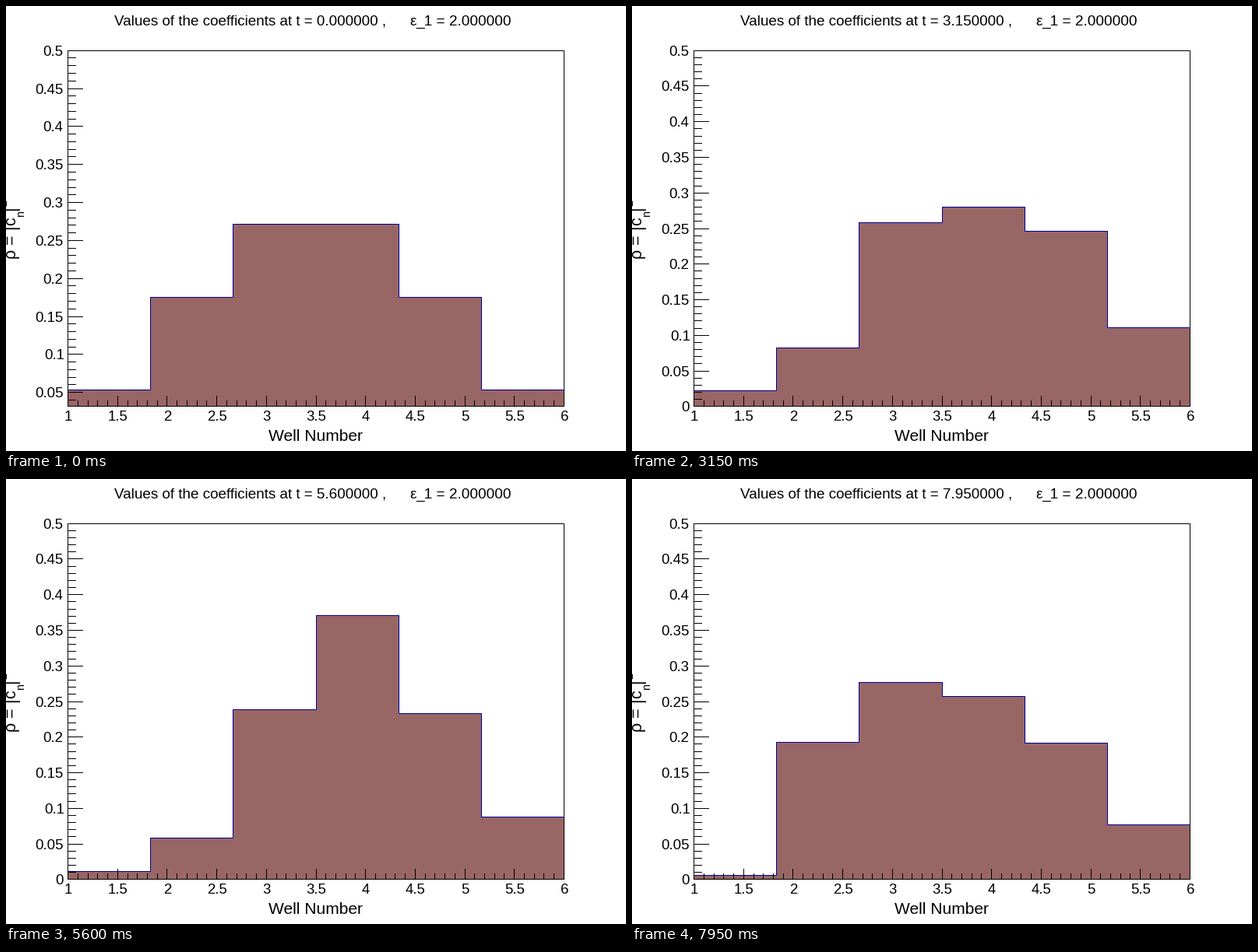
Animation, 796 px wide and 572 px high, one loop 8000 ms. Source, as a matplotlib script:

```python
import numpy as np
import matplotlib.pyplot as plt
from matplotlib.animation import FuncAnimation
from matplotlib.collections import LineCollection
from matplotlib.patches import Polygon

W, H, DPI = 796, 572, 64
PX = 72 / DPI                      # points per pixel
LEFT, RIGHT, TOP, BOTTOM = 79.6, 716.4, 57.2, 514.8
Y_MAX, MARGIN = 0.5, 0.05
FRAMES, STEP = 160, 0.05
WELLS, EPS_1 = 6, 2.0
BLUE, FILL = "#000099", "#996666"

# Chain of coupled wells with a raised first well, started in the
# ground state of the level chain.
ham = -np.eye(WELLS, k=1) - np.eye(WELLS, k=-1)
ham[0, 0] = EPS_1
energy, modes = np.linalg.eigh(ham)
sites = np.arange(1, WELLS + 1)
start = np.sqrt(2 / (WELLS + 1)) * np.sin(np.pi * sites / (WELLS + 1))
weights = modes.T @ start


def density(t):
    return np.abs(modes @ (np.exp(-1j * energy * t) * weights)) ** 2


def centre(v):
    return np.floor(v) + 0.5


def x_pix(x):
    return centre(LEFT + (x - 1) / 5 * (RIGHT - LEFT))


def y_pix(y, low):
    return centre(TOP + (Y_MAX - y) / (Y_MAX - low) * (BOTTOM - TOP))


def axis_low(rho):
    pad = MARGIN * (Y_MAX - rho.min())
    return max(0.0, rho.min() - pad)


fig = plt.figure(figsize=(W / DPI, H / DPI), dpi=DPI, facecolor="white")
ax = fig.add_axes([0, 0, 1, 1])
ax.set_xlim(0, W)
ax.set_ylim(H, 0)
ax.axis("off")


def label(x, y, s, size, ha="left", **kw):
    return ax.text(x, y, s, fontsize=size * PX, ha=ha, va="baseline",
                   family="Liberation Sans", color="black", **kw)


# Points already sit on pixel centres, so snapping is off everywhere.
def strokes(segments):
    lines = LineCollection(segments, colors="black", linewidths=PX,
                           snap=False, zorder=4, capstyle="projecting")
    ax.add_collection(lines)
    return lines


def trace(xs, ys, color, zorder):
    line, = ax.plot(xs, ys, color=color, lw=PX, snap=False, zorder=zorder,
                    solid_joinstyle="miter", solid_capstyle="projecting")
    return line


x0, x1, y0, y1 = (centre(v) for v in (LEFT, RIGHT, TOP, BOTTOM))
edges = x_pix(1 + 5 * np.arange(WELLS + 1) / WELLS)

# Frame and horizontal axis
trace([x0, x1, x1], [y0, y0, y1], "black", 2.5)
strokes([[(x0, y0), (x0, y1)], [(x0, y1), (x1, y1)]])
strokes([[(x_pix(1 + k / 10), y1),
          (x_pix(1 + k / 10), y1 - (13 if k % 5 == 0 else 7))]
         for k in range(51)])
for k in range(11):
    label(LEFT + k * (RIGHT - LEFT) / 10 + 0.5, 533, f"{1 + k / 2:g}",
          18.6, "center")
label(397.5, 559, "Well Number", 21, "center")

# Vertical axis title, set piece by piece from the bottom up
SIZE, BASE = 21.5, 12
pen = 324
for s, drop, scale, width in [
        ("ρ", 0, 1, 0.57 + 0.278), ("=", 0, 1, 0.584 + 0.278),
        ("|", 0, 1, 0.26), ("c", 0, 1, 0.5), ("n", 11, 0.67, 0.556),
        ("|", 0, 1, 0.26), ("2", -11, 0.67, 0.556)]:
    label(BASE + drop, pen, s, SIZE * scale, rotation=90,
          rotation_mode="anchor")
    pen -= width * scale * SIZE

# Title
title = label(139, 24.5, "", 18.9)
label(518, 25, "ε", 19)
label(649, 25, f"_1 = {EPS_1:.6f}", 19, "right")

# Moving parts
area = Polygon([(x0, y1), (x1, y1), (x1, y1)], closed=True, facecolor=FILL,
               edgecolor="none", snap=False, zorder=2)
ax.add_patch(area)
outline = trace([], [], BLUE, 3)
y_ticks = strokes([])
y_labels = [label(73.5 + (2 if k == 2 else 0), 0, f"{k / 20:g}", 18.6, "right")
            for k in range(11)]


def draw(i):
    t = i * STEP
    rho = density(t)
    low = axis_low(rho)

    xs = np.repeat(edges, 2)
    ys = np.concatenate([[y1], np.repeat(y_pix(rho, low), 2), [y1]])
    area.set_xy(np.column_stack([xs, ys]))
    outline.set_data(xs[1:-1], ys[1:-1])

    segments = []
    for k in range(51):
        if k / 100 >= low - 1e-9:
            y = y_pix(k / 100, low)
            segments.append([(x0, y), (x0 + (19 if k % 5 == 0 else 10), y)])
    y_ticks.set_segments(segments)

    for k, text in enumerate(y_labels):
        text.set_visible(k / 20 >= low - 1e-9)
        text.set_y(y_pix(k / 20, low) + 6.5)

    title.set_text(f"Values of the coefficients at t = {t:.6f} ,")
    return [area, outline, y_ticks, title, *y_labels]


anim = FuncAnimation(fig, draw, frames=FRAMES, interval=50, repeat=True,
                     repeat_delay=0, blit=False)
plt.show()
```
